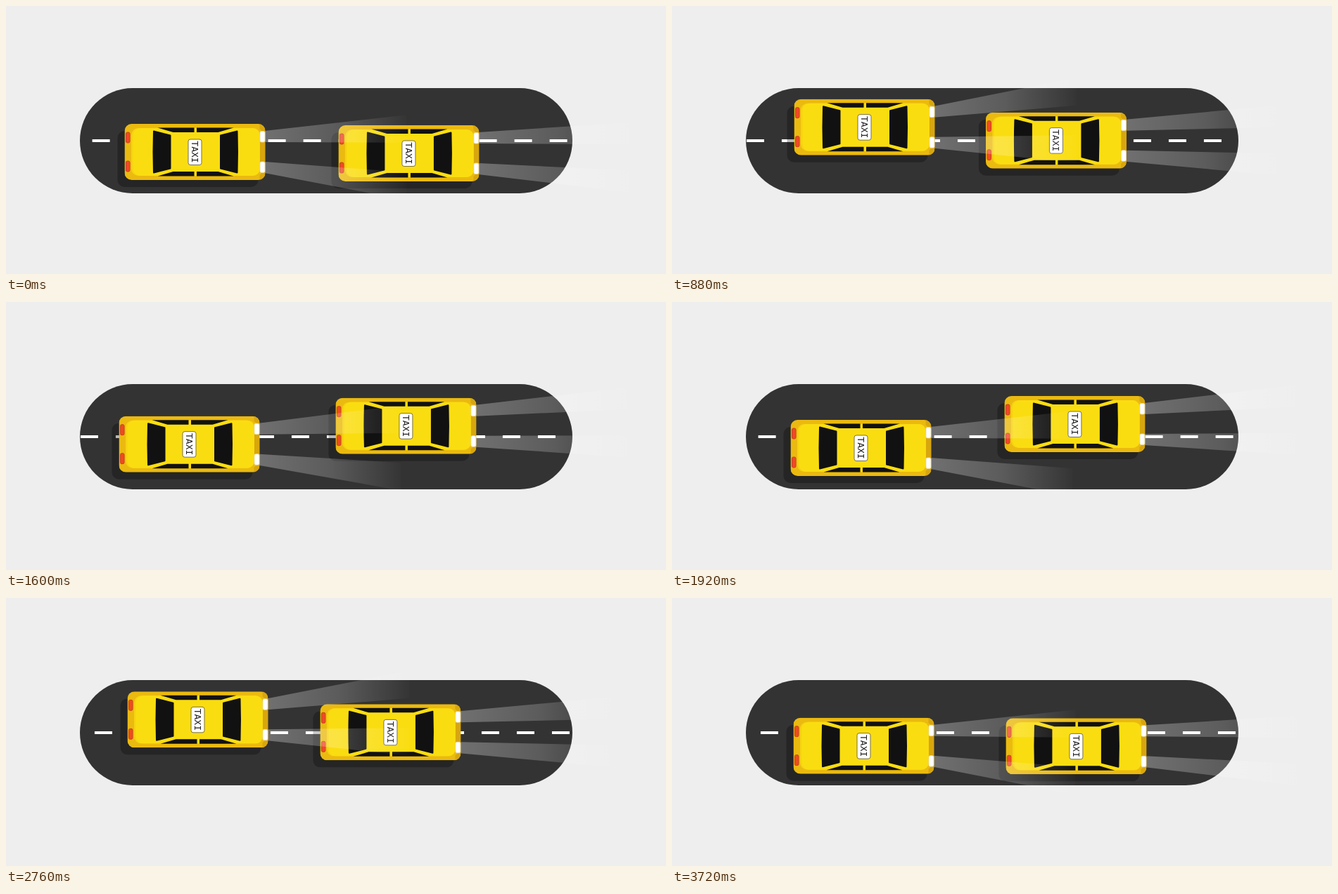
Write an HTML page that moves like this. It is 938 by 382 pixels and loops after 3760 ms.

```html
<!DOCTYPE html>
<html lang="en">
<head>
<meta charset="utf-8">
<title>Taxis</title>
<style>
  html, body { margin: 0; width: 100%; height: 100%; overflow: hidden; background: #eee; }
  svg { display: block; width: 938px; height: 382px; }
  .sign { font: 13px "DejaVu Sans Mono", monospace; fill: #222; text-anchor: middle; }
</style>
</head>
<body>
<svg viewBox="0 0 938 382">
  <defs>
    <linearGradient id="glow">
      <stop offset="0" stop-color="#fff" stop-opacity=".3"/>
      <stop offset=".5" stop-color="#fff" stop-opacity=".2"/>
      <stop offset="1" stop-color="#fff" stop-opacity=".01"/>
    </linearGradient>
    <clipPath id="shell"><rect width="200" height="80" rx="10"/></clipPath>
    <path id="side" fill="#111" d="M47 5.500H99V12H69ZM102.500 5.500H155L133 12H102.500Z"/>
    <g id="lamps">
      <rect x="2" y="12" width="5.500" height="15" rx="2" fill="#f04a24" stroke="#c2451a"/>
      <rect x="192.500" y="10.500" width="7" height="15.500" rx="2" fill="#fff" stroke="#e6d9a8" stroke-width=".8"/>
    </g>
    <g id="car">
      <g clip-path="url(#shell)">
        <rect width="200" height="80" fill="#ebba10"/>
        <rect x="192" width="8" height="80" fill="#d8a60e"/>
      </g>
      <rect x="8.500" y="5.500" width="188" height="69" rx="10" fill="#ebba10"/>
      <rect x="192" y="26" width="5" height="28" fill="#d8a60e"/>
      <rect x="9.500" y="6" width="183" height="68" rx="10" fill="#f6d312"/>
      <rect x="12" y="6" width="180" height="68" rx="10" fill="#fadd10"/>
      <use href="#side"/>
      <use href="#side" transform="matrix(1 0 0 -1 0 80)"/>
      <g fill="#111" stroke="#111" stroke-width="2" stroke-linejoin="round">
        <path d="M41.500 10.500L65 16.500V63.500L41.500 69.500Q40.500 40 41.500 10.500Z"/>
        <path d="M160 10.500L136.500 16.500V63.500L160 69.500Q161 40 160 10.500Z"/>
      </g>
      <use href="#lamps"/>
      <use href="#lamps" transform="matrix(1 0 0 -1 0 80)"/>
      <rect x="90.500" y="22" width="19" height="36.500" rx="3" fill="#fff" stroke="#77704a"/>
      <text class="sign" transform="translate(95.500 40) rotate(90)">TAXI</text>
    </g>
  </defs>
  <rect x="105" y="117" width="700" height="150" rx="75" fill="#333"/>
  <path id="lane" d="M105 192H805" stroke="#fff" stroke-width="4" stroke-dasharray="25"/>
</svg>
<script>
const NS = 'http://www.w3.org/2000/svg';
const stage = document.querySelector('svg');
const lane = document.getElementById('lane');
const LOOP = 3760, LEAD = 0.1;

function add(parent, tag, attrs = {}) {
  const node = document.createElementNS(NS, tag);
  for (const key in attrs) node.setAttribute(key, attrs[key]);
  return parent.appendChild(node);
}

// Linear swing: starts at max, drops by span over sec seconds, then returns.
function swing(t, max, span, sec) {
  const p = (t / sec) % 2;
  return max - span * (p < 1 ? p : 2 - p);
}

function makeCar(spec) {
  const group = add(stage, 'g');
  add(group, 'rect', { x: -10, y: 10, width: 200, height: 80, rx: 10, fill: '#000', 'fill-opacity': 0.28 });
  const beams = [-1, 1].map(side => ({ side, node: add(group, 'path', { fill: 'url(#glow)' }) }));
  add(group, 'use', { href: '#car' });
  return { ...spec, group, beams };
}

const cars = [
  { x: 475.4, xSec: 1, ySec: 2, reach: 226, fan: 1 },
  { x: 174.5, xSec: 0.5, ySec: 1, reach: 202, fan: 1.65 }
].map(makeCar);

function placeCar(car, t) {
  const x = swing(t, car.x, 30, car.xSec);
  const y = swing(t, 172, 40, car.ySec);
  car.group.setAttribute('transform', `translate(${x} ${y})`);
  // Beams widen outwards and tilt with the car's sideways drift.
  const spread = car.reach * car.fan;
  const tilt = 0.0015 * (y - 152);
  for (const { side, node } of car.beams) {
    const inner = 40 + side * 14, outer = 40 + side * 30;
    const farInner = inner + spread * (side * 0.0215 + tilt);
    const farOuter = outer + spread * (side * 0.092 + tilt);
    node.setAttribute('d', `M199 ${outer}L${199 + car.reach} ${farOuter}V${farInner}L199 ${inner}Z`);
  }
}

function draw(ms) {
  // 24 pictures per second, snapped to sixtieths.
  const step = Math.floor((ms % LOOP) / 40);
  const t = Math.floor(step * 2.5) / 60;
  lane.setAttribute('stroke-dashoffset', (400 * t - 17.6) % 50);
  for (const car of cars) placeCar(car, t + LEAD);
}

const start = performance.now();
function tick() {
  draw(performance.now() - start);
  requestAnimationFrame(tick);
}
tick();
</script>
</body>
</html>
```
